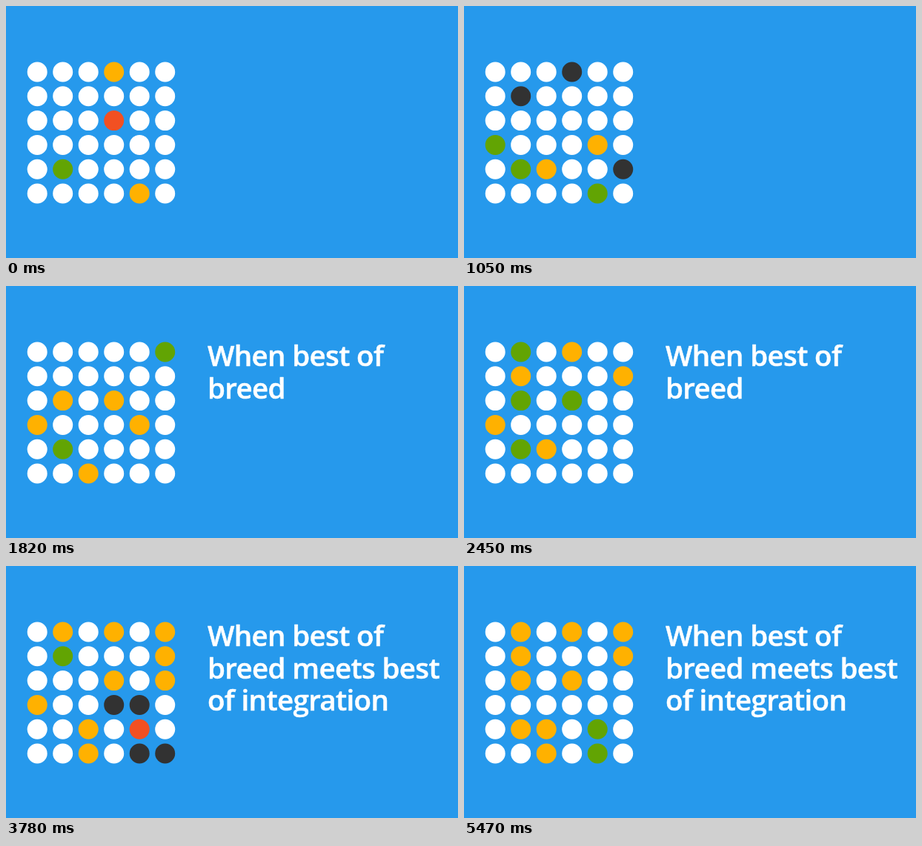
An HTML page with a canvas that plays this animation: 610 by 340 pixels, repeating every 5540 ms.

```html
<!DOCTYPE html>
<html lang="en">
<head>
<meta charset="utf-8">
<title>Dot grid</title>
<style>
html, body { margin: 0; width: 100%; height: 100%; overflow: hidden; background: #2699ec; }
canvas { display: block; }
</style>
</head>
<body>
<canvas id="stage" width="610" height="340"></canvas>
<script>
const ctx = document.getElementById('stage').getContext('2d');
const LOOP = 5540;
const SIZE = 6;
const COLORS = { '.': '#ffffff', o: '#ffb100', r: '#f25022', g: '#62a403', d: '#323232' };

// Stretches in which the grid rests.
const rests = [[0, 70], [3450, 3580], [4740, 4800], [5070, 5400]];

// Key poses of the grid, row by row.
const poses = [
  [0,    '...o.. ...... ...r.. ...... .g.... ....o.'],
  [1050, '...d.. .d.... ...... g...o. .go..d ....g.'],
  [1820, '.....g ...... .o.o.. o...o. .g.... ..o...'],
  [2450, '.g.o.. .o...o .g.g.. o..... .go... ......'],
  [3160, 'do.o.o .g.... ...o.. o..o.. ..o.r. ..o...'],
  [3780, '.o.o.o .g...o ...o.o o..dd. ..o.r. ..o.dd'],
  [5470, '.o.o.o .o...o .o.o.. ...... .oo.g. ..o.g.']
].map(([time, rows]) => ({ at: activeTime(time), dots: [...rows.replaceAll(' ', '')] }));

function clamp(v, low, high) {
  return Math.min(high, Math.max(low, v));
}

function activeTime(t) {
  return rests.reduce((sum, [from, to]) => sum - clamp(t - from, 0, to - from), t);
}

// Between poses, the changing dots switch one by one in a shuffled order.
function dotsAt(t) {
  const now = activeTime(t);
  const next = poses.findIndex(pose => pose.at > now);
  if (next < 0) return poses.at(-1).dots;
  const from = poses[next - 1], to = poses[next];
  const shuffle = i => i * 23 % (SIZE * SIZE);
  const changed = [...from.dots.keys()]
    .filter(i => from.dots[i] !== to.dots[i])
    .sort((a, b) => shuffle(a) - shuffle(b));
  const done = Math.floor(changed.length * (now - from.at) / (to.at - from.at));
  const dots = from.dots.slice();
  for (const i of changed.slice(0, done)) dots[i] = to.dots[i];
  return dots;
}

function fade(t, start, end) {
  const p = clamp((t - start) / (end - start), 0, 1);
  return p * p * (3 - 2 * p);
}

function write(text, x, line, alpha) {
  const y = 108 + line * 43.5;
  ctx.globalAlpha = alpha;
  ctx.fillText(text, x, y);
  ctx.strokeText(text, x, y);
  ctx.globalAlpha = 1;
}

function draw(t) {
  ctx.fillStyle = '#2699ec';
  ctx.fillRect(0, 0, 610, 340);

  dotsAt(t).forEach((color, i) => {
    ctx.fillStyle = COLORS[color];
    ctx.beginPath();
    ctx.arc(42.2 + i % SIZE * 34.5, 89 + Math.floor(i / SIZE) * 32.8, 13.5, 0, Math.PI * 2);
    ctx.fill();
  });

  ctx.fillStyle = ctx.strokeStyle = '#ffffff';
  ctx.lineWidth = 0.5;
  ctx.lineJoin = 'round';
  ctx.font = '600 38.5px "Open Sans", "Noto Sans", sans-serif';
  ctx.letterSpacing = '-0.65px';
  const first = fade(t, 1500, 1800);
  const second = fade(t, 2750, 3120);
  const left = 272;
  write('When best of', left, 0, first);
  write('breed', left, 1, first);
  write('meets best', left + ctx.measureText('breed ').width, 1, second);
  write('of integration', left, 2, second);
}

const start = performance.now();
function tick() {
  draw((performance.now() - start) % LOOP);
  requestAnimationFrame(tick);
}
tick();
</script>
</body>
</html>
```
